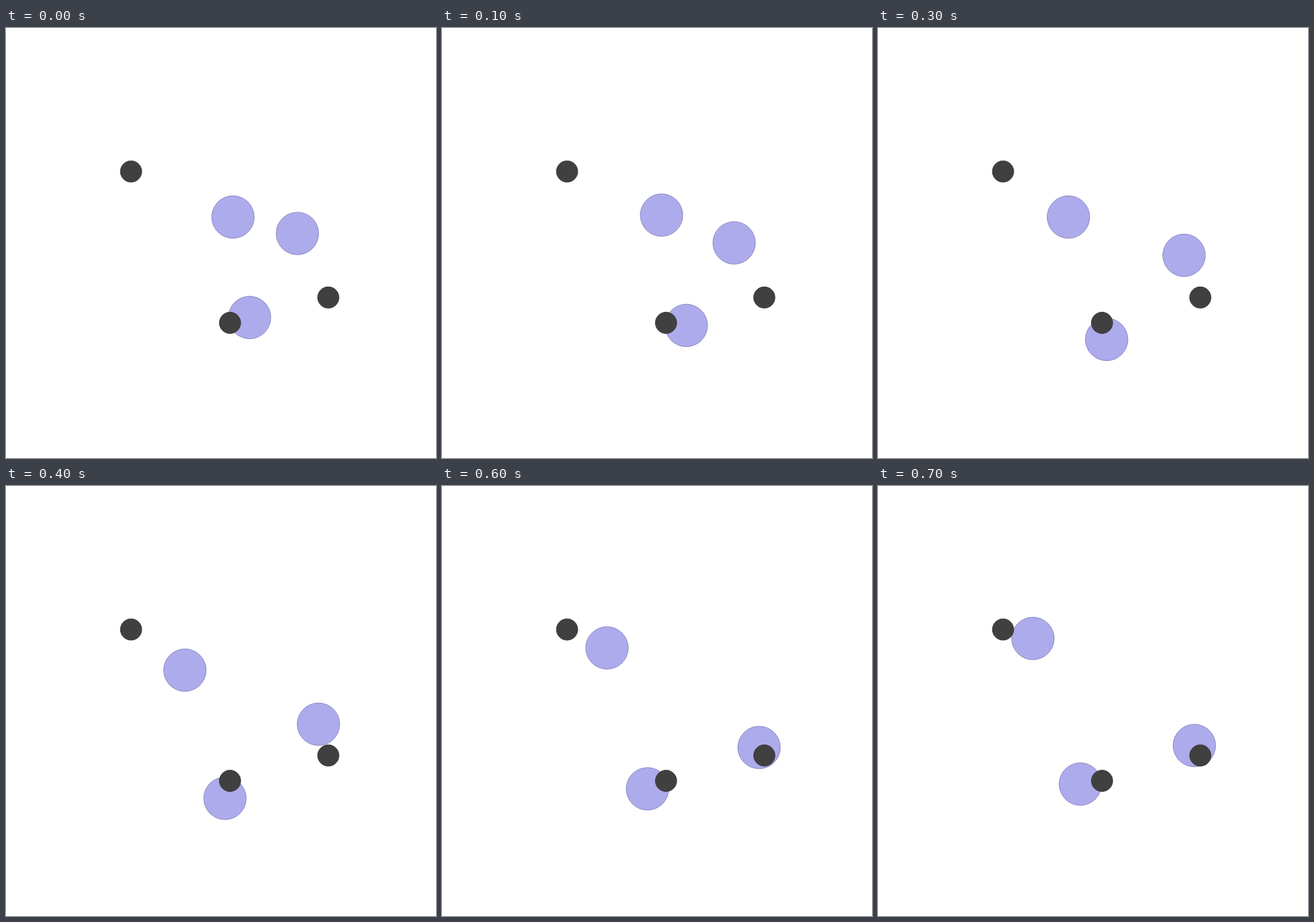
An HTML page that plays this animation: 700x700 px, repeating every 0.8 s.

```html
<!DOCTYPE html>
<html lang="en">
<head>
<meta charset="utf-8">
<title>Moving discs</title>
<style>
  html, body { margin: 0; width: 100%; height: 100%; overflow: hidden; background: #fff; }
  svg { display: block; width: 100%; height: 100%; }
  .disc { fill: #adabeb; stroke: #8685c0; }
  .dot { fill: #404040; stroke: #3a3a3a; }
</style>
</head>
<body>
<svg viewBox="0 0 700 700"></svg>
<script>
const STEP = 100, STEPS = 8;
// Each disc follows one smooth curve through its key points
const keys = [0, 2, 3, 5, 7];
const paths = [
  [[369.5, 307.7], [334, 307.7], [310, 307.7], [278.7, 283.7], [252.2, 248.2]],
  [[474.4, 334.5], [485.7, 358.5], [498.2, 370], [514.7, 409.2], [515, 422.5]],
  [[396.5, 471.3], [387.5, 498], [372.2, 507], [343.4, 502.8], [329.4, 485.2]]
];
const dots = [[203.6, 233.6], [364.7, 480], [524.7, 438.7]];
const svg = document.querySelector("svg");

// Lagrange weight of key i at time t
const weight = (t, i) => keys.reduce(
  (w, k, j) => j === i ? w : w * (t - k) / (keys[i] - k), 1);

const pointAt = (path, t) => [0, 1].map(axis =>
  path.reduce((sum, point, i) => sum + point[axis] * weight(t, i), 0));

function place(el, [x, y]) {
  el.setAttribute("cx", x);
  el.setAttribute("cy", y);
}

function circle(kind, r, pos) {
  const el = document.createElementNS("http://www.w3.org/2000/svg", "circle");
  el.setAttribute("class", kind);
  el.setAttribute("r", r);
  place(el, pos);
  svg.append(el);
  return el;
}

const discs = paths.map(path => circle("disc", 34.6, path[0]));
dots.forEach(pos => circle("dot", 17.4, pos));

let start;
function draw(now) {
  start ??= now;
  const step = Math.floor((now - start) / STEP) % STEPS;
  discs.forEach((disc, i) => place(disc, pointAt(paths[i], step)));
  requestAnimationFrame(draw);
}
requestAnimationFrame(draw);
</script>
</body>
</html>
```
